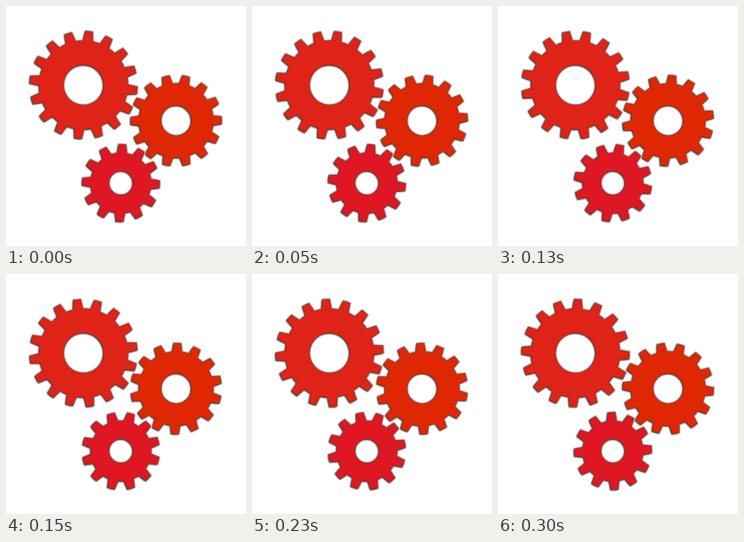
Animation, 300 px wide and 300 px high, one loop 0.35 s. Source, as an HTML page with a canvas:

```html
<!DOCTYPE html>
<html lang="en">
<head>
<meta charset="utf-8">
<title>Turning gears</title>
<style>
html, body { margin: 0; width: 100%; height: 100%; overflow: hidden; background: #fff; }
canvas { display: block; }
</style>
</head>
<body>
<canvas id="stage" width="300" height="300"></canvas>
<script>
const ctx = document.getElementById('stage').getContext('2d');
const STEPS = 7, STEP_MS = 50;

// start: angle in degrees of one tooth, clockwise from the top
const gears = [
  { x: 97, y: 98.7, teeth: 16, tip: 67.3, root: 55.5, hole: 25, start: 5.8, dir: 1, color: '#df2317' },
  { x: 212.8, y: 143.2, teeth: 14, tip: 56.8, root: 46.5, hole: 18.8, start: 12.5, dir: -1, color: '#df2803' },
  { x: 143.8, y: 221.2, teeth: 12, tip: 48.4, root: 37.8, hole: 14.9, start: 2, dir: 1, color: '#df1722' }
].map(gear => ({ ...gear, pitch: 2 * Math.PI / gear.teeth }));

function gearPath({ x, y, teeth, tip, root, hole, pitch }, turn) {
  const path = new Path2D();
  const tipHalf = 4.6 / tip, rootHalf = 6.2 / root;
  for (let i = 0; i < teeth; i++) {
    const a = turn + i * pitch;
    path.arc(x, y, tip, a - tipHalf, a + tipHalf);
    path.arc(x, y, root, a + rootHalf, a + pitch - rootHalf);
  }
  path.closePath();
  path.moveTo(x + hole, y);
  path.arc(x, y, hole, 0, 2 * Math.PI);
  return path;
}

function outline(path, width, color) {
  ctx.lineWidth = width;
  ctx.strokeStyle = color;
  ctx.stroke(path);
}

function drawGear(gear, phase) {
  const turn = gear.start * Math.PI / 180 - Math.PI / 2 + gear.dir * gear.pitch * phase;
  const path = gearPath(gear, turn);
  ctx.lineJoin = 'round';
  outline(path, 3.2, '#cfcccb');

  // soft shade on the lower-left edges
  ctx.save();
  ctx.shadowColor = 'rgba(40, 20, 18, 0.75)';
  ctx.shadowBlur = 2;
  ctx.shadowOffsetX = -1;
  ctx.shadowOffsetY = 1;
  ctx.fillStyle = gear.color;
  ctx.fill(path, 'evenodd');
  ctx.restore();

  outline(path, 1.2, 'rgba(85, 50, 46, 0.45)');
}

function draw(now) {
  const phase = Math.floor(now / STEP_MS) % STEPS / STEPS;
  ctx.fillStyle = '#fff';
  ctx.fillRect(0, 0, 300, 300);
  gears.forEach(gear => drawGear(gear, phase));
}

let begin;
function tick(now) {
  begin ??= now;
  draw(now - begin);
  requestAnimationFrame(tick);
}
draw(0);
requestAnimationFrame(tick);
</script>
</body>
</html>
```
